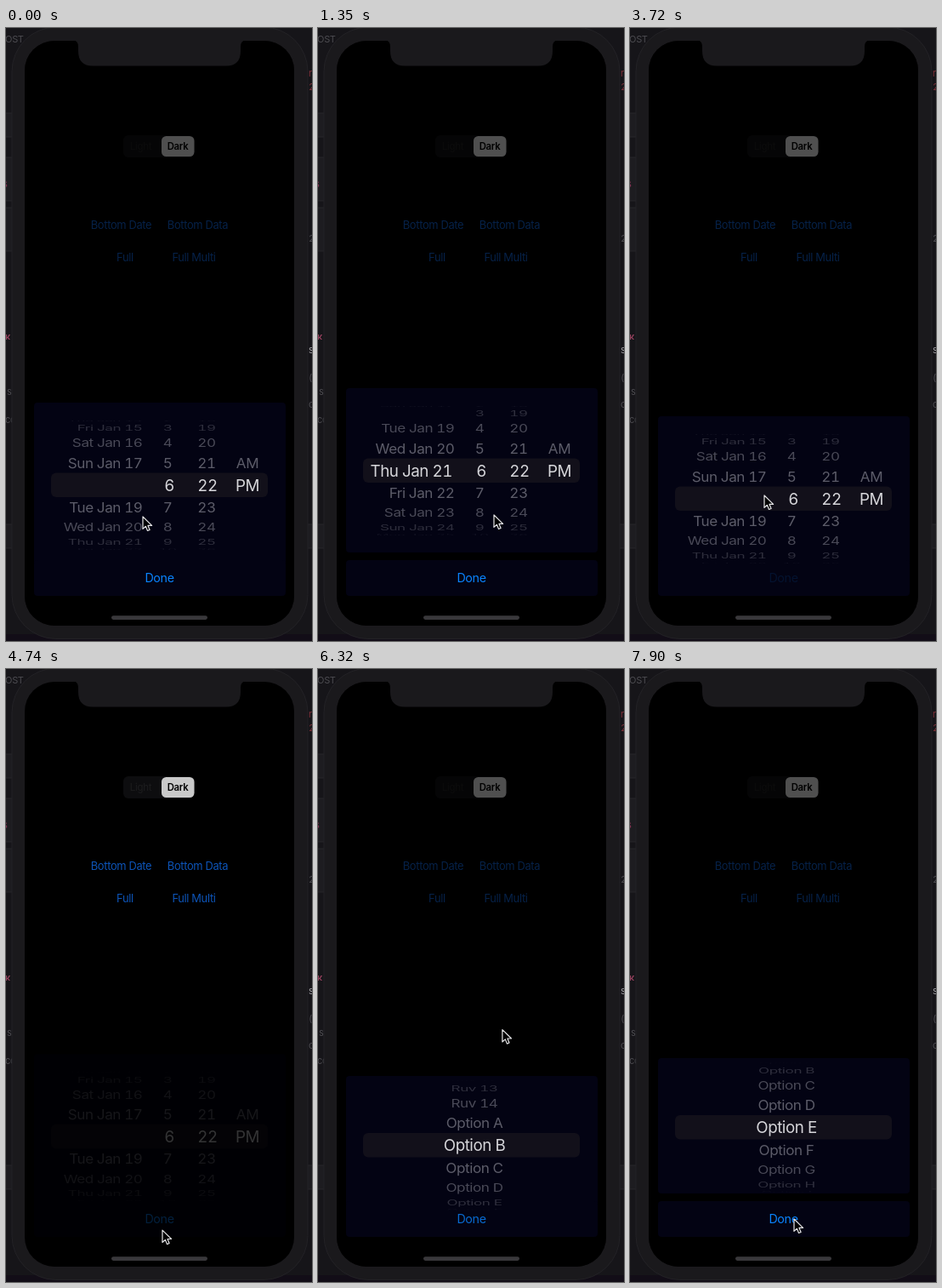
An HTML page for the animation above (8 s loop, 360 by 720 pixels).

```html
<!DOCTYPE html>
<html lang="en">
<head>
<meta charset="utf-8">
<title>Picker sheets</title>
<style>
html, body { margin: 0; width: 100%; height: 100%; overflow: hidden; background: #141317; }
svg { display: block; width: 360px; height: 720px; }
text { font-family: Inter, "Open Sans", sans-serif; letter-spacing: -.025em; white-space: pre; font-variant-numeric: tabular-nums; }
.mid { text-anchor: middle; }
.link { font-size: 12.9px; fill: #106ae8; text-anchor: middle; }
.code { font-size: 11px; fill: #4c4b50; }
.row { font-size: 17.1px; fill: #d8d8e0; }
.sel { font-size: 18.8px; fill: #d6d6da; }
</style>
</head>
<body>
<svg viewBox="0 0 360 720">
  <defs>
    <clipPath id="screen"><rect x="22" y="15" width="317" height="687" rx="35"/></clipPath>
    <clipPath id="inBand"><rect x="33" y="-14.5" width="296" height="28"/></clipPath>
    <clipPath id="offBand"><path d="M33-76H329V-14.5H33ZM33 13.5H329V76H33Z"/></clipPath>
  </defs>

  <!-- desktop behind the phone -->
  <rect width="360" height="720" fill="#161519"/>
  <rect y="712" width="360" height="8" fill="#120d17"/>
  <g fill="#1d1c20" stroke="#2b2a2e" stroke-width=".8">
    <rect x="-5" y="100" width="13" height="28"/>
    <rect x="-5" y="152" width="13" height="51"/>
    <rect x="-5" y="211" width="13" height="51"/>
    <rect x="-5" y="583" width="370" height="28"/>
  </g>
  <g class="code">
    <text x="-1" y="17">OST</text>
    <text x="1" y="431">s</text>
    <text x="-1" y="464">co</text>
    <text x="-1" y="366" fill="#93405c" font-weight="600">κ</text>
    <text x="-4" y="187" fill="#8a3355">s</text>
    <text x="356" y="57" fill="#7c3038">r</text>
    <text x="356" y="73" fill="#7c3038">2</text>
    <text x="356" y="251">2</text>
    <text x="356" y="382" fill="#a09fa3">s</text>
    <text x="356" y="414">(</text>
    <text x="356" y="446">c</text>
  </g>

  <!-- phone -->
  <rect x="7" y="-1" width="348" height="718.5" rx="52" fill="#1a191c" stroke="#232226"/>
  <rect x="22" y="15" width="317" height="687" rx="35"/>
  <g clip-path="url(#screen)">
    <rect x="138" y="126" width="84" height="26" rx="6" fill="#111113"/>
    <rect x="183" y="127" width="38.5" height="24" rx="5.5" fill="#fff"/>
    <text class="mid" x="158.500" y="143" font-size="11.5" fill="#242426">Light</text>
    <text class="mid" x="202" y="143" font-size="11.3" font-weight="600">Dark</text>
    <text class="link" x="135.500" y="236.300">Bottom Date</text>
    <text class="link" x="225.500" y="236.300">Bottom Data</text>
    <text class="link" x="140" y="274.300">Full</text>
    <text class="link" x="221" y="274.300">Full Multi</text>
    <rect id="dim" x="22" y="15" width="317" height="687"/>
    <g id="sheet">
      <rect id="panel" x="33" width="296" rx="4" fill="#030313"/>
      <rect x="33" y="625" width="296" height="42" rx="4" fill="#030313"/>
      <g id="wheel">
        <rect x="53" y="-14.500" width="255" height="28.500" rx="6" fill="#12101a"/>
        <g id="rows" clip-path="url(#offBand)"></g>
        <g id="picked" clip-path="url(#inBand)"></g>
      </g>
      <text id="done" class="mid" x="180.500" y="651" font-size="14.3" fill="#0a84ff">Done</text>
    </g>
  </g>
  <path d="M79 14H282Q276 15 276 22V27Q276 44.500 259 44.500H102Q85 44.500 85 27V22Q85 15 79 14Z" fill="#1a191c"/>
  <rect x="124" y="690.300" width="113" height="4.600" rx="2.300" fill="#39383b"/>
  <path id="cursor" d="M1 1V15.400L4.400 12.300 6.500 17.500 9.100 16.400 7 11.400H11.600Z" fill="#000" stroke="#e4e4e6" stroke-width="1.200" stroke-linejoin="round"/>
</svg>
<script>
const LOOP = 8000, STEP = 112.9;          // the screen refreshes about nine times a second
const RADIUS = 77.7, PITCH = 19.8 * Math.PI / 180;
const DAYS = ['Thu', 'Fri', 'Sat', 'Sun', 'Mon', 'Tue', 'Wed'];
const TODAY = 18, FADE = 650, FADE_SLIDE = 42, DIM = 0.69;
const $ = id => document.getElementById(id);
const clamp = v => Math.max(0, Math.min(1, v));
const ease = v => v * v * (3 - 2 * v);
const ramp = (t, a, b) => ease(clamp((t - a) / (b - a)));

// time, x, y of the pointer tip
const POINTER = [
  [0, 160, 573], [450, 206, 571], [1580, 206, 571], [2032, 203, 338],
  [2715, 203, 338], [3160, 150, 230], [3380, 150, 230], [3725, 157, 548],
  [4180, 183, 659], [4850, 183, 658], [5700, 227, 228], [6000, 227, 228],
  [6600, 207, 578], [7450, 207, 578], [7900, 192, 645], [8000, 192, 645]
];

function pointerAt(t) {
  const i = Math.max(1, POINTER.findIndex(p => p[0] >= t));
  const [t0, x0, y0] = POINTER[i - 1], [t1, x1, y1] = POINTER[i];
  const e = ramp(t, t0, t1);
  return [x0 + (x1 - x0) * e, y0 + (y1 - y0) * e];
}

const dayName = d => d === TODAY ? '' : `${DAYS[d % 7]} Jan ${d}`;
const optionName = i => i < 0 ? `Ruv ${15 + i}` : `Option ${String.fromCharCode(65 + i)}`;

// Rows of one column laid on a cylinder; big = magnified copy for the band
function column(name, pos, x, anchor, big) {
  let out = '';
  for (let i = Math.ceil(pos - 4.3); i <= pos + 4.3; i++) {
    const a = (i - pos) * PITCH, c = Math.cos(a), label = name(i);
    if (!label || c <= 0.05 || (big && Math.abs(i - pos) > 1.1)) continue;
    const y = RADIUS * Math.sin(a) * (big ? 1.04 : 1);
    out += `<text class="${big ? 'sel' : 'row'}" text-anchor="${anchor}" ` +
      `opacity="${big ? 1 : (0.45 * c ** 1.2).toFixed(3)}" ` +
      `transform="translate(${x} ${y.toFixed(2)}) scale(1 ${c.toFixed(3)})" y="${big ? 6.7 : 6.2}">${label}</text>`;
  }
  return out;
}

function dateColumns(pos, big) {
  return column(dayName, pos, big ? 158 : 160.5, 'end', big) +
    column(String, 6, big ? 192 : 190, 'middle', big) +
    column(String, 22, big ? 237 : 236, 'middle', big) +
    column(i => ['AM', 'PM'][i], 1, 284, 'middle', big);
}

const dataColumns = (pos, big) => column(optionName, pos, 184, 'middle', big);

// Each visit of a sheet: when it settles, when it starts to leave
const VISITS = [
  { from: -400, settle: -115, leave: 2145, date: true },
  { from: 3400, settle: 3726, leave: 4290, date: true },
  { from: 5900, settle: 6244, leave: 9000, date: false }
];

function draw(time) {
  const t = Math.floor((time + 5) / STEP) * STEP;
  // the first dismissal stalls for a moment
  const stalled = t < 2800 ? Math.min(t, 2484) : t - 225;
  const visit = VISITS.filter(v => t >= v.from).pop();
  const clock = visit === VISITS[0] ? stalled : t;
  const gone = clamp((clock - visit.leave) / FADE);
  const since = t - visit.settle;
  const shown = clamp((since + 230) / 230) * (1 - gone);
  const shift = 33 * Math.exp(-since / 173) + FADE_SLIDE * gone;
  const top = visit.date ? 423 : 457;
  const centre = visit.date ? 520 : 538.5;

  $('dim').setAttribute('opacity', DIM * shown);
  $('sheet').setAttribute('opacity', shown ** 1.2);
  $('panel').setAttribute('y', top + shift);
  $('panel').setAttribute('height', 616 - top);
  $('wheel').setAttribute('transform', `translate(0 ${centre + shift})`);
  $('done').setAttribute('opacity', clamp((since + 14) / 115));

  let pos, columns;
  if (visit.date) {
    const turned = visit === VISITS[0] ? 3 * ramp(t, 560, 1320) : 0;
    pos = TODAY + turned * Math.pow(1 - gone, 2.31);
    columns = dateColumns;
  } else {
    pos = 1 + 3 * ramp(t, 6990, 7600);
    columns = dataColumns;
  }
  $('rows').innerHTML = shown ? columns(pos, false) : '';
  $('picked').innerHTML = shown ? columns(pos, true) : '';

  const [x, y] = pointerAt(t);
  $('cursor').setAttribute('transform', `translate(${x.toFixed(1)} ${y.toFixed(1)})`);
}

const start = performance.now();
function tick() {
  draw((performance.now() - start) % LOOP);
  requestAnimationFrame(tick);
}
tick();
</script>
</body>
</html>
```
